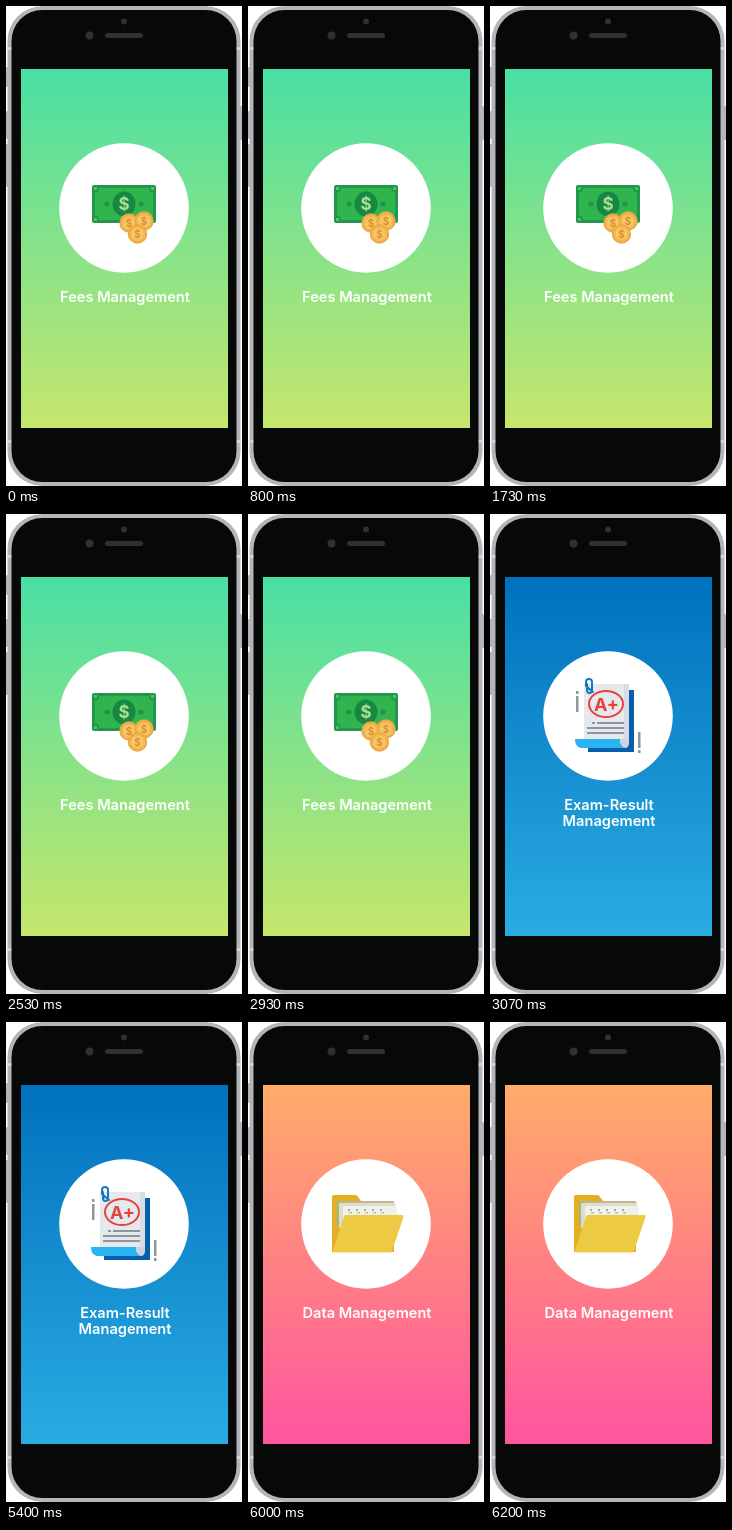
An HTML page with a canvas for the animation above (8.99 s loop, 236x480 px).

```html
<!DOCTYPE html>
<html lang="en">
<head>
<meta charset="utf-8">
<title>School app screens</title>
<style>
html, body { margin: 0; width: 100%; height: 100%; overflow: hidden; background: #fff; }
canvas { display: block; width: 236px; height: 480px; }
</style>
</head>
<body>
<canvas id="stage" width="236" height="480"></canvas>
<script>
const ctx = document.getElementById('stage').getContext('2d');
const LOOP = 8990;
const FONT = 'Inter, "Open Sans", sans-serif';

function rect(x, y, w, h, color) {
  ctx.fillStyle = color;
  ctx.fillRect(x, y, w, h);
}

function round(x, y, w, h, r, color) {
  ctx.fillStyle = color;
  ctx.beginPath();
  ctx.roundRect(x, y, w, h, r);
  ctx.fill();
}

function oval(x, y, rx, ry, color, line) {
  ctx.beginPath();
  ctx.ellipse(x, y, rx, ry, 0, 0, Math.PI * 2);
  if (line) {
    ctx.strokeStyle = color;
    ctx.lineWidth = line;
    ctx.stroke();
  } else {
    ctx.fillStyle = color;
    ctx.fill();
  }
}

const disc = (x, y, r, color) => oval(x, y, r, r, color);

function shape(path, color, line) {
  const p = new Path2D(path);
  if (line) {
    ctx.strokeStyle = color;
    ctx.lineWidth = line;
    ctx.lineCap = 'round';
    ctx.lineJoin = 'round';
    ctx.stroke(p);
  } else {
    ctx.fillStyle = color;
    ctx.fill(p);
  }
}

function label(text, x, y, size, weight, color) {
  ctx.font = `${weight} ${size}px ${FONT}`;
  ctx.textAlign = 'center';
  ctx.textBaseline = 'alphabetic';
  ctx.fillStyle = color;
  ctx.fillText(text, x, y);
}

function drawPhone() {
  rect(0, 0, 236, 480, '#fff');
  for (const [y, h] of [[61, 20], [105, 28], [138, 43]]) round(0, y, 5, h, 1, '#b3b4ba');
  round(231, 100, 5, 34, 1, '#b3b4ba');
  round(1.5, 0, 233, 480, 35, '#b4b5bb');
  for (const y of [41, 434]) {
    rect(1.5, y, 5, 3, '#d5d6da');
    rect(229.5, y, 5, 3, '#d5d6da');
  }
  round(5.5, 4, 225, 472, 31, '#070808');
  disc(118, 15.5, 3, '#302f31');
  disc(83.5, 29.5, 4, '#302f31');
  round(99, 27, 38, 5, 2.5, '#302f31');
}

function coin(x, y) {
  disc(x, y, 9.7, '#eca843');
  disc(x, y, 7.6, '#f9c766');
  oval(x, y, 6.5, 6.5, '#eeb14d', 1);
  label('$', x, y + 3.6, 10, 600, '#d98b2b');
}

function drawMoney() {
  round(86, 179, 64, 38, 2, '#24964a');
  shape('M93 182H143Q143 186 147 187V209Q143 210 143 214H93Q93 210 89 209V187Q93 186 93 182Z', '#30b44e');
  for (const x of [88, 145]) rect(x, 181, 3, 3, '#41c763');
  rect(88, 212, 3, 3, '#41c763');
  disc(101, 198, 2.6, '#21914a');
  disc(135, 198, 2.6, '#21914a');
  oval(118, 198, 11.5, 12.5, '#198744');
  label('$', 118, 204, 17, 700, '#a9df91');
  coin(123, 217);
  coin(138, 215);
  coin(131.5, 228);
}

function drawExam() {
  rect(98, 176, 46, 62, '#075fa9');
  rect(94, 170, 45, 60, '#e5e9ed');
  rect(134, 170, 5, 60, '#d6dde4');
  shape('M85 225H130Q130 234 138 234H91Q85 233 85 225Z', '#29b5f1');
  shape('M130 225H139V230Q138 234 135 234Q130 233 130 225Z', '#cbd5de');

  shape('M103 178L96 172V168Q96 165 99 165Q102 165 102 168V176Q102 179 99.5 179Q97 179 97 176V170',
    '#1478c1', 2);
  oval(116, 190, 17, 13, '#e6433c', 2);
  label('A+', 116.5, 196.5, 18, 700, '#e6433c');

  const grey = '#8c969e';
  rect(102, 208, 3, 2, grey);
  rect(107, 208, 27, 2, grey);
  rect(97, 213, 37, 2, grey);
  rect(97, 218, 37, 2, grey);
  rect(86, 177, 2.5, 3, grey);
  rect(86, 182, 2.5, 16, grey);
  rect(148, 218, 2.5, 16, grey);
  rect(148, 236, 2.5, 3, grey);
}

function drawFolder() {
  shape('M84 230V175Q84 173 86 173H107Q109 173 110 175L113 179H146V230Z', '#e5ae20');
  rect(89, 179, 57, 25, '#c3b68c');
  rect(89, 180, 5, 24, '#98bd75');
  rect(91, 181, 56, 25, '#dedbd0');
  rect(95, 184, 54, 22, '#f1f1ec');
  for (let x = 100; x < 140; x += 8) {
    rect(x, 187, 2, 2, '#aaa99f');
    rect(x + 1, 190, 3, 1.5, '#bcbbb1');
  }
  shape('M98 193H154Q156 193 155.5 195L144 229Q143.5 230.5 142 230.5H86Q84.5 230 85 228L96 194.5Q96.5 193 98 193Z',
    '#edca43');
}

const scenes = [
  { start: 0, top: '#49dfa5', bottom: '#c6e66c', lines: ['Fees Management'], icon: drawMoney },
  { start: 3000, top: '#0071bd', bottom: '#2aabe2', lines: ['Exam-Result', 'Management'], icon: drawExam },
  { start: 6000, top: '#ffac69', bottom: '#ff559f', lines: ['Data Management'], icon: drawFolder }
];

function drawScene({ top, bottom, lines, icon }) {
  const fill = ctx.createLinearGradient(0, 63, 0, 422);
  fill.addColorStop(0, top);
  fill.addColorStop(1, bottom);
  rect(15, 63, 207, 359, fill);
  disc(118, 202, 64.8, '#fff');
  icon();
  lines.forEach((line, i) => label(line, 119, 296 + i * 16, 14.6, 600, '#fff'));
}

const began = performance.now();

function frame() {
  const t = (performance.now() - began) % LOOP;
  drawPhone();
  drawScene(scenes.findLast(scene => scene.start <= t));
  requestAnimationFrame(frame);
}

frame();
</script>
</body>
</html>
```
